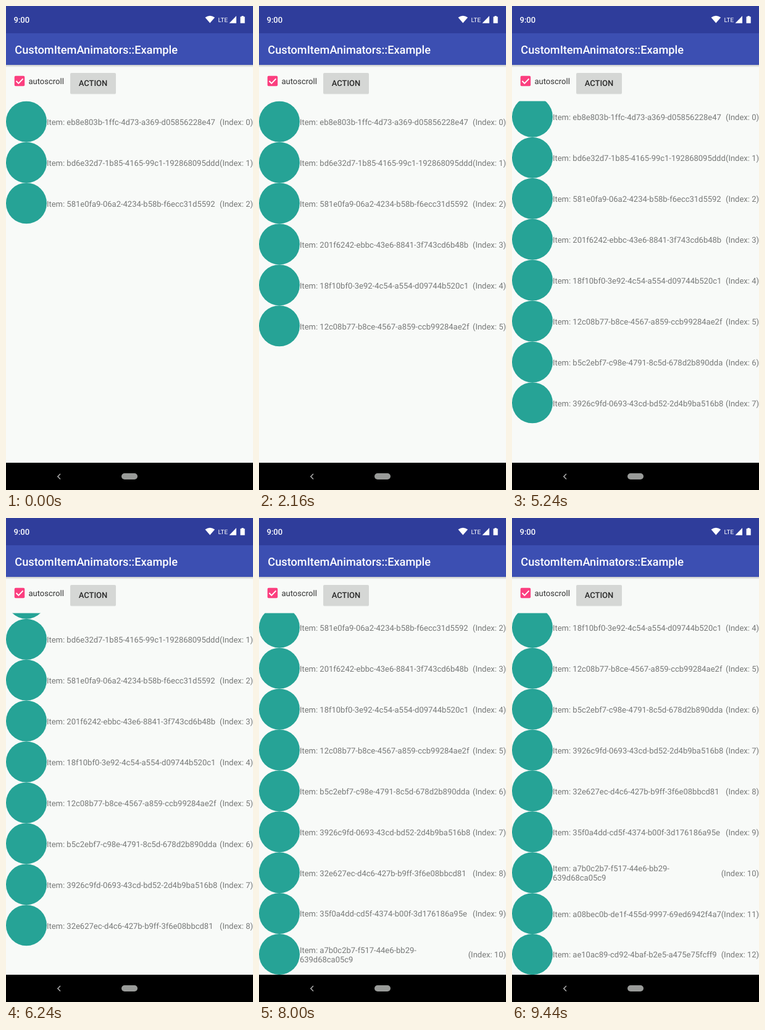
An HTML page that plays this animation: 400 by 781 pixels, repeating every 10 s.

```html
<!DOCTYPE html>
<html lang="en">
<head>
<meta charset="utf-8">
<title>Item animators</title>
<style>
  html, body { margin: 0; width: 100%; height: 100%; overflow: hidden; background: #f8faf8; }
  svg { display: block; font: 13px Roboto, sans-serif; text-rendering: geometricPrecision; }
  .medium { font-weight: 500; }
  .row { fill: #777978; }
</style>
</head>
<body>
<svg width="400" height="781" viewBox="0 0 400 781">
  <defs>
    <clipPath id="list"><rect y="153.5" width="400" height="583.5"/></clipPath>
    <linearGradient id="shade" x2="0" y2="1">
      <stop stop-opacity=".2"/><stop offset="1" stop-opacity="0"/>
    </linearGradient>
  </defs>
  <rect width="400" height="781" fill="#f8faf8"/>

  <!-- status bar and title -->
  <rect y="95" width="400" height="4" fill="url(#shade)"/>
  <rect y="43" width="400" height="52" fill="#3c4fb2"/>
  <rect width="400" height="44" fill="#2f3d9b"/>
  <g fill="#fff">
    <text class="medium" x="12.5" y="26.7">9:00</text>
    <path d="M330.3 27.6L322.5 18.6Q330.3 13 338.1 18.6Z"/>
    <text x="343.5" y="25.6" font-size="10">LTE</text>
    <path d="M373 16V27.7H361.5Z"/>
    <path d="M379.5 17.2H381.5V16H384.7V17.2H386.7V27.7H379.5Z"/>
    <text class="medium" x="14.3" y="76.8" font-size="18.2">CustomItemAnimators::Example</text>
  </g>

  <!-- controls -->
  <rect x="13.7" y="112.8" width="16.5" height="16.5" rx="2" fill="#fb3f7f"/>
  <path d="M16.5 121L20.3 124.8L27.5 117.4" fill="none" stroke="#fff" stroke-width="1.9"/>
  <text x="36.5" y="126" fill="#333">autoscroll</text>
  <rect x="104" y="109" width="74" height="33.3" rx="2" opacity=".12"/>
  <rect x="104" y="108" width="74" height="33" rx="2" fill="#d5d7d5"/>
  <text class="medium" x="141" y="129.1" text-anchor="middle" fill="#2a2a2a">ACTION</text>

  <g id="rows" clip-path="url(#list)"></g>

  <!-- navigation bar -->
  <rect y="737" width="400" height="44"/>
  <path d="M88 755L83.8 759.2L88 763.4" fill="none" stroke="#b4b4b4" stroke-width="1.4"/>
  <rect x="187" y="754" width="26" height="10" rx="5" fill="#999b99"/>
</svg>
<script>
const LOOP = 10000, TOP = 153.5, VIEW = 583.5, ROW = 65.93, FIRST = 3;
const MOVE = 310, ADD = 140;
const starts = [20, 980, 1990, 2990, 3990, 5028, 6043, 6975, 7995, 8970];
const ids = [
  'eb8e803b-1ffc-4d73-a369-d05856228e47', 'bd6e32d7-1b85-4165-99c1-192868095ddd',
  '581e0fa9-06a2-4234-b58b-f6ecc31d5592', '201f6242-ebbc-43e6-8841-3f743cd6b48b',
  '18f10bf0-3e92-4c54-a554-d09744b520c1', '12c08b77-b8ce-4567-a859-ccb99284ae2f',
  'b5c2ebf7-c98e-4791-8c5d-678d2b890dda', '3926c9fd-0693-43cd-bd52-2d4b9ba516b8',
  '32e627ec-d4c6-427b-b9ff-3f6e08bbcd81', '35f0a4dd-cd5f-4374-b00f-3d176186a95e',
  'a7b0c2b7-f517-44e6-bb29-\n639d68ca05c9', 'a08bec0b-de1f-455d-9997-69ed6942f4a7',
  'ae10ac89-cd92-4baf-b2e5-a475e75fcff9'
];

const list = document.getElementById('rows');
list.innerHTML = ids.map((id, i) => {
  const lines = ('Item: ' + id).split('\n');
  const label = lines.map((line, n) =>
    `<text x="65.9" y="${38.4 + (n - (lines.length - 1) / 2) * 14.8}">${line}</text>`).join('');
  return `<g class="row"><circle cx="33" cy="33" r="33" fill="#26a396"/>${label}
    <text x="400" y="38.4" text-anchor="end">(Index: ${i})</text></g>`;
}).join('');
const rows = [...list.children];

const ease = x => (1 - Math.cos(Math.PI * Math.min(1, Math.max(0, x)))) / 2;
const overflow = n => Math.max(0, n * ROW - VIEW);

function draw(t) {
  let scroll = 0;
  const shown = rows.map((_, i) => {
    if (i < FIRST) return 1;
    const age = t - starts[i - FIRST];
    if (age < 0) return 0;
    // Older rows make room first, then the new row slides down and fades in.
    const wait = overflow(i + 1) ? MOVE : 0;
    if (wait) scroll += (overflow(i + 1) - overflow(i)) * ease(age / MOVE);
    return ease((age - wait) / ADD);
  });
  rows.forEach((row, i) => {
    const y = TOP + i * ROW - scroll - (1 - shown[i]) * ROW;
    row.setAttribute('transform', `translate(0 ${y.toFixed(2)})`);
    row.setAttribute('opacity', shown[i]);
  });
}

const begin = performance.now();
function frame() {
  draw((performance.now() - begin) % LOOP);
  requestAnimationFrame(frame);
}
frame();
</script>
</body>
</html>
```
